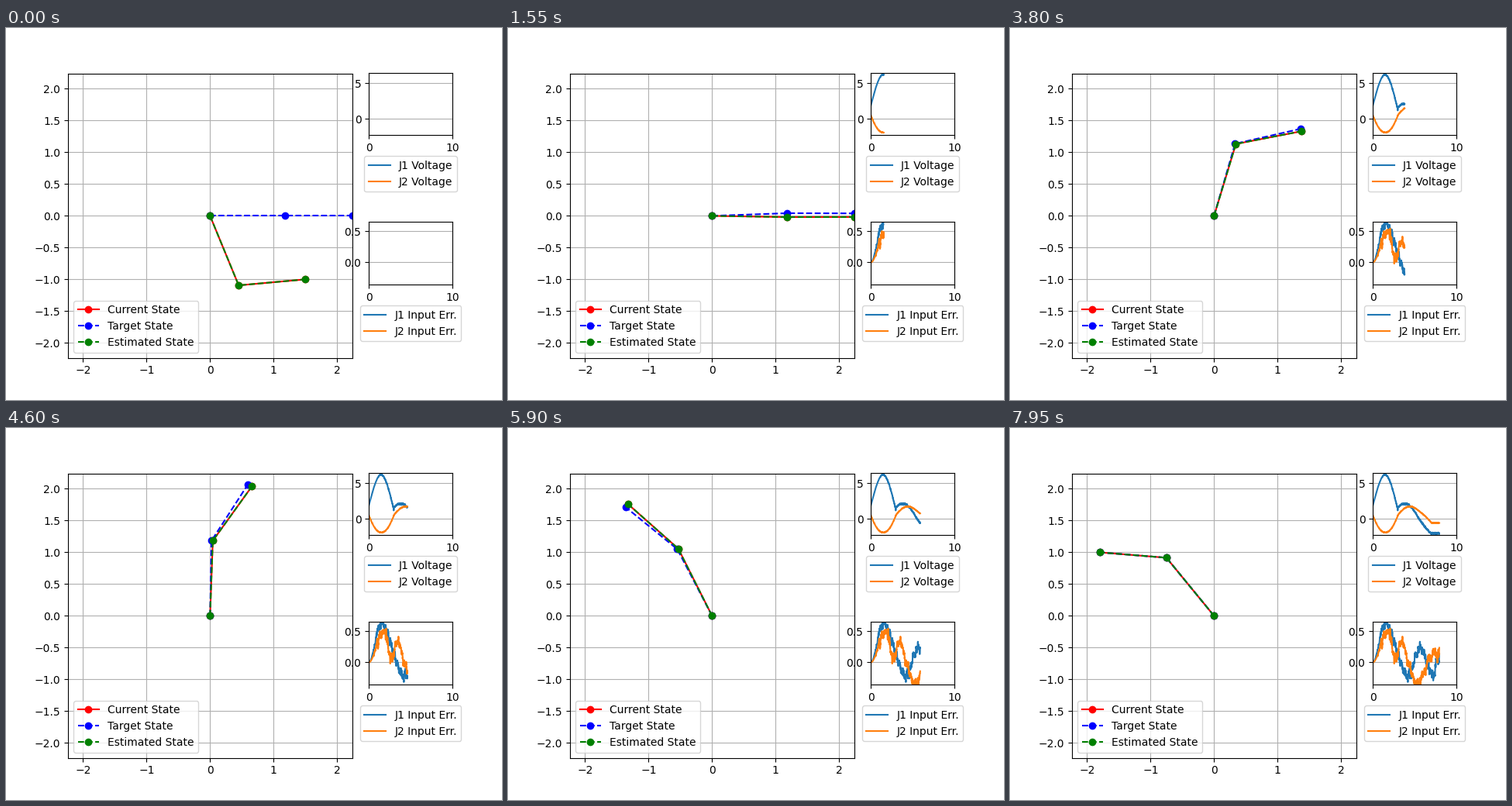
Recreate the animation shown at these times as a matplotlib script. Size 640x480 px, loop 8000 ms.

```python
import numpy as np
import matplotlib.pyplot as plt
from matplotlib.animation import FuncAnimation

FRAMES, STEP = 160, 50          # frame count, ms per frame
L1, L2 = 1.4 ** 0.5, 1.11 ** 0.5
LIM = L1 + L2
DELAY, LAG = 0.02, 0.044        # s: goal behind clock, arm behind goal


def inverse(x, y, elbow):
    """Joint angles that put the tip at (x, y)."""
    q2 = elbow * np.arccos((x * x + y * y - L1 ** 2 - L2 ** 2) / (2 * L1 * L2))
    q1 = np.arctan2(y, x) - np.arctan2(L2 * np.sin(q2), L1 + L2 * np.cos(q2))
    return np.array([q1, q2])


WAYPOINTS = [inverse(1.5, -1, 1), inverse(1.5, 1, -1), inverse(-1.8, 1, 1)]


def trajectory(t):
    """Cubic motion between waypoints: angles, velocities, accelerations."""
    leg, start, span = (0, 0, 3) if t < 3 else (1, 3, 4)
    a, b = WAYPOINTS[leg:leg + 2]
    s = (t - start) / span
    if s < 0 or s >= 1:
        return (a if s < 0 else b), np.zeros(2), np.zeros(2)
    d = b - a
    return (a + d * s * s * (3 - 2 * s),
            d * 6 * s * (1 - s) / span,
            d * (6 - 12 * s) / span ** 2)


def arm(q):
    x1, y1 = L1 * np.cos(q[0]), L1 * np.sin(q[0])
    a = q[0] + q[1]
    return [0, x1, x1 + L2 * np.cos(a)], [0, y1, y1 + L2 * np.sin(a)]


def voltages(t):
    """Gravity load plus back EMF plus inertia."""
    q, v, acc = trajectory(t)
    c1, c12 = np.cos(q[0]), np.cos(q[0] + q[1])
    return (1.79 * c1 + 0.87 * c12 + 3.0 * v[0] + 0.22 * acc[0],
            0.55 * c12 + 1.93 * v[1])


rng = np.random.default_rng(4)
times = np.arange(0, 8.001, 0.01)


def jitter(size, keep):
    """Noise in which each sample remembers part of the last one."""
    out, value = [], 0.0
    for n in rng.normal(0, size * (1 - keep ** 2) ** 0.5, len(times)):
        value = keep * value + n
        out.append(value)
    return np.array(out)


def swing(*turns):
    """Ease between (time, value) turning points, with noise on top."""
    trend = np.zeros(len(times))
    last = (0, 0)
    for turn in turns:
        s = np.clip((times - last[0]) / (turn[0] - last[0]), 0, 1)
        trend += (turn[1] - last[1]) * s * s * (3 - 2 * s)
        last = turn
    return trend + np.clip((times - 0.4) / 0.7, 0, 1) * jitter(0.045, 0.8)


volt = np.array([voltages(t) for t in times]).T
volt[0] += jitter(0.06, 0.5) * np.clip(times / 3, 0.2, 1)
volt[1] += jitter(0.02, 0.5)
err = [swing((1.5, 0.63), (4.2, -0.2), (5.6, 0.22), (7.3, -0.19), (7.8, 0.05)),
       swing((1.8, 0.52), (2.7, 0.05), (3.3, 0.33), (5.2, -0.34), (7.4, 0.16))]

fig = plt.figure(figsize=(6.4, 4.8), dpi=100)
main = plt.subplot2grid((4, 4), (0, 0), rowspan=4, colspan=3)
main.set_aspect("equal")
main.set(xlim=(-LIM, LIM), ylim=(-LIM, LIM),
         xticks=range(-2, 3), yticks=np.arange(-2, 2.1, 0.5))
main.grid(True)
current, = main.plot([], [], "ro-", label="Current State")
target, = main.plot([], [], "bo--", label="Target State")
estimate, = main.plot([], [], "go--", label="Estimated State")
main.legend(loc="lower left")


def side_plot(row, ylim, yticks, kind):
    ax = plt.subplot2grid((4, 4), (row, 3))
    ax.set(xlim=(0, 10), ylim=ylim, xticks=[0, 10], yticks=yticks)
    ax.grid(True)
    lines = [ax.plot([], [], label=f"J{j} {kind}")[0] for j in (1, 2)]
    ax.legend(loc="upper center", bbox_to_anchor=(0.5, -0.254))
    return lines


volt_lines = side_plot(0, (-2.234, 6.5), [0, 5], "Voltage")
err_lines = side_plot(2, (-0.354, 0.65), [0, 0.5], "Input Err.")


def draw(i):
    t = i * STEP / 1000 - DELAY
    # the goal is still at zero before the first control step
    target.set_data(*arm(trajectory(t)[0] if i else np.zeros(2)))
    pose = arm(trajectory(t - LAG)[0])
    current.set_data(*pose)
    estimate.set_data(*pose)
    n = i * 5 + 1 if i else 0
    for line, data in zip(volt_lines + err_lines, [*volt, *err]):
        line.set_data(times[:n], data[:n])
    return [current, target, estimate, *volt_lines, *err_lines]


anim = FuncAnimation(fig, draw, frames=FRAMES, interval=STEP,
                     repeat=True, repeat_delay=0, blit=False)
plt.show()
```
